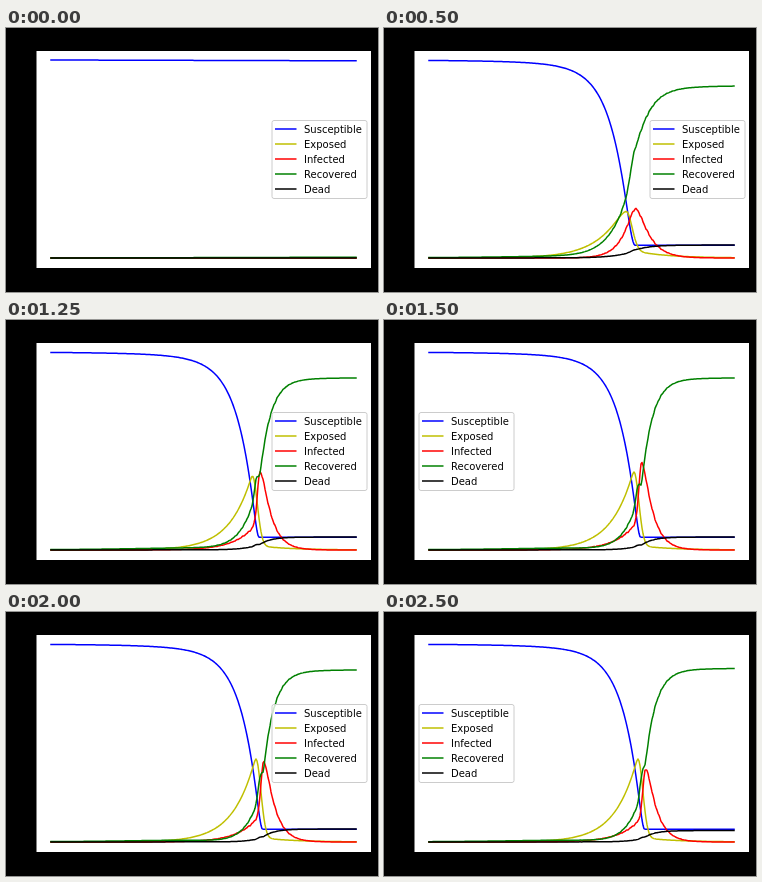
An HTML page for the animation above (2750 ms loop, 372 by 264 pixels).

```html
<!DOCTYPE html>
<html lang="en">
<head>
<meta charset="utf-8">
<title>Epidemic curves</title>
<style>
html, body { margin: 0; width: 100%; height: 100%; overflow: hidden; background: #000; }
svg { display: block; }
#curves path { fill: none; stroke-width: 1.5; stroke-linejoin: round; stroke-linecap: square; }
#legend line { stroke-width: 1.5; }
#legend text { font: 10px "DejaVu Sans", sans-serif; fill: #000; }
</style>
</head>
<body>
<svg width="372" height="264" viewBox="0 0 372 264">
  <rect width="372" height="264" fill="#000"/>
  <rect x="30.5" y="23" width="334.5" height="217" fill="#fff"/>
  <g id="curves"></g>
  <g id="legend">
    <rect x=".5" y="92.5" width="95" height="78" rx="2" fill="#fff" fill-opacity=".8" stroke="#ccc"/>
  </g>
</svg>
<script>
const LEFT = 45, RIGHT = 350, BASE = 230, TOTAL = 198, CAUGHT = 185.2, STEP = 250;
const series = [
  ['Susceptible', '#00f'],
  ['Exposed', '#bfbf00'],
  ['Infected', '#f00'],
  ['Recovered', '#008000'],
  ['Dead', '#000']
];

// Exponential decay with a rounded start of size w.
const decay = (d, w, tau) => Math.exp((w - Math.hypot(d, w)) / tau);
const bell = (d, w) => Math.exp(-((d / w) ** 2));

// Total number that has left the susceptible group.
function caught(x, { end, round, tau }) {
  const d = Math.max(0, end - x);
  return (CAUGHT - 14) * decay(d, round, tau) + 14 * Math.exp(-d / 60);
}

function exposed(x, { at, peak, round, tau, fall, tail }) {
  const d = x - at;
  if (d < 0) return peak * decay(d, round, tau);
  return (peak - tail) * bell(d, fall) + tail * Math.exp(-d / 33);
}

function infected(x, { at, peak, spike, rise, riseTau, fall, fallTau, rough }) {
  const d = x - at;
  const h = d < 0
    ? peak * ((1 - spike) * decay(d, rise, riseTau) + spike * bell(d, 3.6))
    : peak * decay(d, fall, fallTau);
  const wave = (Math.sin(x * 1.15) + Math.sin(x * 2.1 + 1)) / 2;
  return h + rough * wave * Math.min(1, h / 25);
}

const slow = {
  s: { end: 306, round: 22, tau: 28 },
  e: { at: 288, peak: 32, round: 15, tau: 36, fall: 15, tail: 6 },
  i: { at: 294, peak: 34, spike: 0, rise: 8, riseTau: 16, fall: 14, fallTau: 15, rough: 1.6 },
  fatal: .075, left: true
};

const medium = {
  s: { end: 251, round: 6, tau: 17 },
  e: { at: 242.5, peak: 46.5, round: 6, tau: 25, fall: 8, tail: 9 },
  i: { at: 251.5, peak: 49, spike: 0, rise: 5, riseTau: 11, fall: 6, fallTau: 12, rough: 1 },
  fatal: .07
};

const fast = (end, ePeak, iPeak, left, fatal = .07) => ({
  s: { end, round: 3, tau: 17 },
  e: { at: end - 6.5, peak: ePeak, round: 1, tau: 22, fall: 6.8, tail: 5 },
  i: { at: end + 1, peak: iPeak, spike: .61, rise: 1, riseTau: 20, fall: 4, fallTau: 9.8, rough: 1 },
  fatal, left
});

const scenes = [
  {}, slow, medium,
  fast(250, 58, 60), fast(250, 70.5, 70),
  fast(253, 74, 78), fast(256.5, 78, 87, true),
  fast(256.5, 81, 83), fast(256.5, 83, 80),
  fast(258.5, 83, 76, true), fast(260.5, 83, 73, true, .062)
];

// Every person is in exactly one group, so the recovered are what remains.
function groups(x, { s, e, i, fatal }) {
  if (!s) {
    const r = .8 * (x - LEFT) / (RIGHT - LEFT);
    return [TOTAL - r, 0, 0, r, 0];
  }
  const out = caught(x, s), ex = exposed(x, e), inf = infected(x, i);
  const resolved = Math.max(0, out - ex - inf);
  return [TOTAL - out, ex, inf, resolved * (1 - fatal), resolved * fatal];
}

function trace(scene) {
  const lines = series.map(() => []);
  for (let x = LEFT; x <= RIGHT; x++)
    groups(x, scene).forEach((h, k) => lines[k].push(x + ' ' + (BASE - h).toFixed(2)));
  return lines.map(points => 'M' + points.join('L'));
}

function add(parent, tag, attrs) {
  const el = document.createElementNS('http://www.w3.org/2000/svg', tag);
  for (const name in attrs) el.setAttribute(name, attrs[name]);
  return parent.appendChild(el);
}

const curves = document.getElementById('curves');
const legend = document.getElementById('legend');
const paths = series.map(([name, stroke], k) => {
  const y = 101 + k * 15;
  add(legend, 'line', { x1: 3.5, x2: 25, y1: y, y2: y, stroke });
  add(legend, 'text', { x: 32.5, y: y + 4 }).textContent = name;
  return add(curves, 'path', { stroke });
});
const traces = scenes.map(trace);

let shown = -1;
function draw() {
  const index = Math.floor(performance.now() / STEP) % scenes.length;
  if (index !== shown) {
    shown = index;
    paths.forEach((p, k) => p.setAttribute('d', traces[index][k]));
    legend.setAttribute('transform', `translate(${scenes[index].left ? 34.5 : 265.5} 0)`);
  }
  requestAnimationFrame(draw);
}
draw();
</script>
</body>
</html>
```
